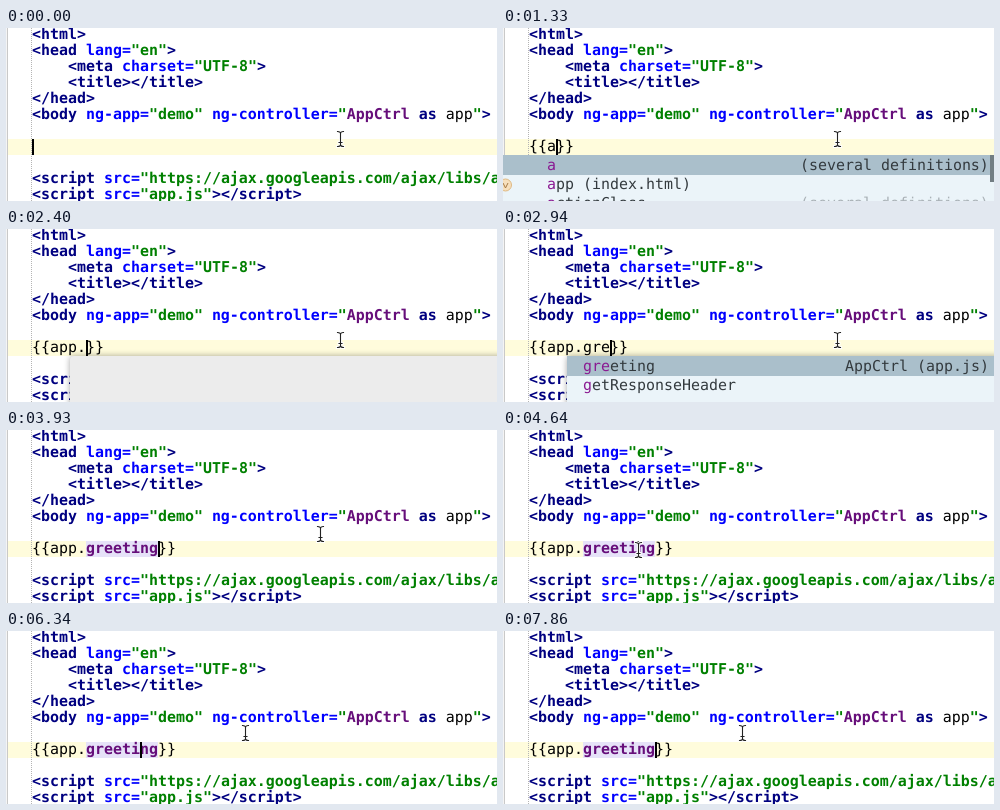
An HTML page for the animation above (8000 ms loop, 491 by 173 pixels).

```html
<!DOCTYPE html>
<html lang="en">
<head>
<meta charset="UTF-8">
<title>Editor completion</title>
<style>
  html, body { margin: 0; width: 100%; height: 100%; overflow: hidden; background: #fff; }
  svg { display: block; width: 491px; height: 173px; }
  text { font: 14.95px "DejaVu Sans Mono", monospace; white-space: pre; text-rendering: geometricPrecision; }
  .n { fill: #000080; font-weight: bold; }
  .b { fill: #0000ff; font-weight: bold; }
  .g { fill: #008000; font-weight: bold; }
  .p { fill: #660e7a; font-weight: bold; }
  .i { fill: #660e7a; font-weight: bold; font-style: italic; }
  .k { fill: #000; }
  .f { fill: #7a7a43; }
  .v { fill: #458383; }
  .m { fill: #8a1a92; }
  .d { fill: #333a3e; }
  .s { fill: #a9b1b6; }
</style>
</head>
<body>
<svg id="stage" viewBox="0 0 491 173" xmlns="http://www.w3.org/2000/svg">
  <defs>
    <filter id="soft" x="-10%" y="-30%" width="120%" height="160%"><feGaussianBlur stdDeviation="3"/></filter>
  </defs>
  <rect width="491" height="173" fill="#fff"/>
  <g id="view"></g>
  <g id="mouse" fill="none" stroke-linecap="square">
    <path d="M-3-7.5Q0-7.500-6.500-7.5 3-7.5M0-6V6M-3 7.500 7.500 6Q0 7.500 3 7.5M-1.500 3.500H1.500" stroke="none"/>
    <path class="beam" stroke="#fff" stroke-width="3"/>
    <path class="beam" stroke="#222" stroke-width="1.1"/>
  </g>
</svg>
<script>
const LOOP = 8000, LEFT = 26, CELL = 9, ROW = 16, BASE = 11;
const view = document.getElementById("view");
const mouse = document.getElementById("mouse");
mouse.firstElementChild.remove();
for (const beam of mouse.querySelectorAll(".beam")) {
  beam.setAttribute("d", "M-3-7.5Q0-7.500 0-5.500Q0-7.500 3-7.5M0-5.500V5.500M-3 7.5Q0 7.500 0 5.500Q0 7.500 3 7.5M-1.500 3.500H1.500");
}

// Each piece starts with the letter of its style.
const HTML = [
  [0, 0, "n<html>"],
  [1, 0, "n<head ", "blang=", 'g"en"', "n>"],
  [2, 4, "n<meta ", "bcharset=", 'g"UTF-8"', "n>"],
  [3, 4, "n<title></title>"],
  [4, 0, "n</head>"],
  [5, 0, "n<body ", "bng-app=", 'g"demo" ', "bng-controller=", 'g"', "pAppCtrl ", "nas ", "kapp", 'g"', "n>"],
  [9, 0, "n<script ", "bsrc=", 'g"https://ajax.googleapis.com/ajax/libs/angularjs'],
  [10, 0, "n<script ", "bsrc=", 'g"app.js"', "n><\/script>"]
];
const JS = [
  [1, 0, "idemo", "k.", "fcontroller", "k(", 'g"AppCtrl"', "k, ", "nfunction ", "k() {"],
  [2, 4, "nvar ", "vapp", "k = ", "nthis", "k;"],
  [4, 4, "vapp", "k.", "pgreeting", "k = ", 'g"Hello world"', "k;"],
  [5, 0, "k})"],
  [7, 0, "idemo", "k.", "ffilter", "k(", 'g"whoa"', "k, ", "nfunction ", "k() {"],
  [8, 4, "nreturn function ", "k() {"],
  [9, 8, "nreturn ", 'g"whoa"', "k;"],
  [10, 4, "k}"]
];

// time, typed text, caret column
const TYPING = [
  [0, "", 0], [620, "{", 1], [790, "{{}}", 2], [1330, "{{a}}", 3],
  [1590, "{{ap}}", 4], [2040, "{{app}}", 5], [2130, "{{app.}}", 6],
  [2760, "{{app.gr}}", 8], [2940, "{{app.gre}}", 9], [3300, "{{app.greeting}}", 14],
  [4550, "{{app.greeting}}", 12], [7680, "{{app.greeting}}", 13], [7860, "{{app.greeting}}", 14]
];

// time, popup kind, prefix length, items
const SEVERAL = "(several definitions)";
const POPUPS = [
  [0, ""],
  [1330, "wide", 1, ["a", SEVERAL], ["app (index.html)", ""], ["actionClass", SEVERAL]],
  [1590, "wide", 2, ["app (index.html)", ""], ["appendChild", SEVERAL], ["applets", SEVERAL]],
  [2040, "wide", 3, ["app (index.html)", ""], ["appendChild", SEVERAL], ["applets", SEVERAL]],
  [2130, ""],
  [2310, "fade"],
  [2400, "blank"],
  [2490, "list", 0, ["greeting", "AppCtrl (app.js)"], ["constructor", "Object"], ["hasOwnProperty", "Object"]],
  [2760, "list", 2, ["greeting", "AppCtrl (app.js)"], ["getResponseHeader", ""], ["getRootNode", ""]],
  [2940, "list", 3, ["greeting", "AppCtrl (app.js)"], ["getResponseHeader", ""]],
  [3300, ""]
];

const MOUSE = [
  [0, 334, 111], [3930, 314, 104], [4010, 272, 91], [4110, 222, 83], [4190, 178, 95],
  [4280, 148, 118], [4370, 136, 132], [4460, 135, 124], [4550, 135, 120],
  [4990, 143, 121], [5080, 166, 118], [5170, 194, 112], [5260, 219, 106],
  [5350, 234, 103], [5440, 239, 102]
];
const CARET_OFF = [[80, 620], [4280, 4550], [5440, 5890], [7330, 7680]];
const BULB = [[4110, 4550], [7150, 7680]];

const at = (steps, t) => steps.findLast(step => step[0] <= t);
const during = (spans, t) => spans.some(([a, b]) => t >= a && t < b);
const esc = s => s.replace(/&/g, "&amp;").replace(/</g, "&lt;");
const rect = (x, y, w, h, fill, extra = "") =>
  `<rect x="${x}" y="${y}" width="${w}" height="${h}" fill="${fill}" ${extra}/>`;
const text = (x, y, pieces) => `<text x="${x}" y="${y}">` +
  pieces.map(p => `<tspan class="${p[0]}">${esc(p.slice(1))}</tspan>`).join("") + "</text>";
const line = ([row, col, ...pieces]) => text(LEFT + col * CELL, BASE + row * ROW, pieces);
const mark = (row, col, len, fill) =>
  rect(LEFT + col * CELL, row * ROW - 1, len * CELL, ROW, fill);

function frame(row) {
  return rect(0, 0, 1, 173, "#f4f4f4") + rect(1, 0, 1, 173, "#c9c9c9") +
    rect(2, row * ROW - 1, 489, ROW, "#fffcdc") +
    '<path d="M25.5 0V173" stroke="#b4b4b4" stroke-dasharray="1 1"/>';
}

function items(x, prefix, list) {
  return list.map(([name, note], i) => {
    const y = 142 + i * 19;
    const hit = name.startsWith("get") ? 1 : prefix;
    const right = 486 - note.length * CELL;
    return text(x, y, ["m" + name.slice(0, hit), "d" + name.slice(hit)]) +
      text(right, y, [(i ? "s" : "d") + note]);
  }).join("");
}

function popup([, kind, prefix, ...list]) {
  if (!kind) return "";
  if (kind === "wide") {
    const badge = list[0][0] === "a" ? 157 : 137;
    return rect(0, 127, 491, 46, "#ebf4f9") + rect(0, 127, 491, 20, "#aabfcb") +
      `<circle cx="2.500" cy="${badge}" r="6" fill="#f7dfbd" stroke="#dfb982"/>` +
      `<path d="M0 ${badge - 2}l2.500 5 2.500-5" fill="none" stroke="#a77a45"/>` +
      items(44, prefix, list) + rect(487, 127, 4, 27, "#727d83");
  }
  const box = rect(64, 127, 440, 60, "#000", 'rx="4" opacity=".35" filter="url(#soft)"') +
    rect(64, 127, 440, 60, kind === "list" ? "#ebf4f9" : "#ececec", 'rx="4"');
  if (kind === "fade") return `<g opacity=".5">${box}</g>`;
  return kind === "blank" ? box : box + rect(64, 127, 427, 20, "#aabfcb") + items(80, prefix, list);
}

function bulb() {
  return '<circle cx="40" cy="101" r="4.500" fill="#ffe36b" stroke="#c9a227"/>' +
    rect(38, 105, 4, 4, "#8b8b8b") + rect(39, 109, 2, 1, "#666");
}

function page(t) {
  const [, typed, col] = at(TYPING, t);
  const named = t >= 3570;
  const pieces = named ? ["k{{app.", "pgreeting", "k}}"] : ["k" + typed];
  return frame(7) + (named ? mark(7, 6, 8, "#e6e2f8") : "") +
    HTML.map(line).join("") + line([7, 0, ...pieces]) +
    (during(BULB, t) ? bulb() : "") + caret(7, col, t) + popup(at(POPUPS, t));
}

function module(t) {
  const marks = t < 4900 ? "" : mark(4, 4, 4, "#dcdff5") + mark(2, 8, 4, "#f5eaf8");
  return frame(4) + marks + JS.map(line).join("") + caret(4, 4, t);
}

function caret(row, col, t) {
  return during(CARET_OFF, t) ? "" : rect(LEFT + col * CELL, row * ROW - 1, 2, ROW, "#000");
}

let shown = "";
function draw(now) {
  const t = now % LOOP;
  const next = t >= 4810 && t < 6340 ? module(t) : page(t);
  if (next !== shown) view.innerHTML = shown = next;
  const [, x, y] = at(MOUSE, t);
  mouse.setAttribute("transform", `translate(${x + 0.5} ${y})`);
}

const start = performance.now();
function tick() {
  draw(performance.now() - start);
  requestAnimationFrame(tick);
}
tick();
</script>
</body>
</html>
```
